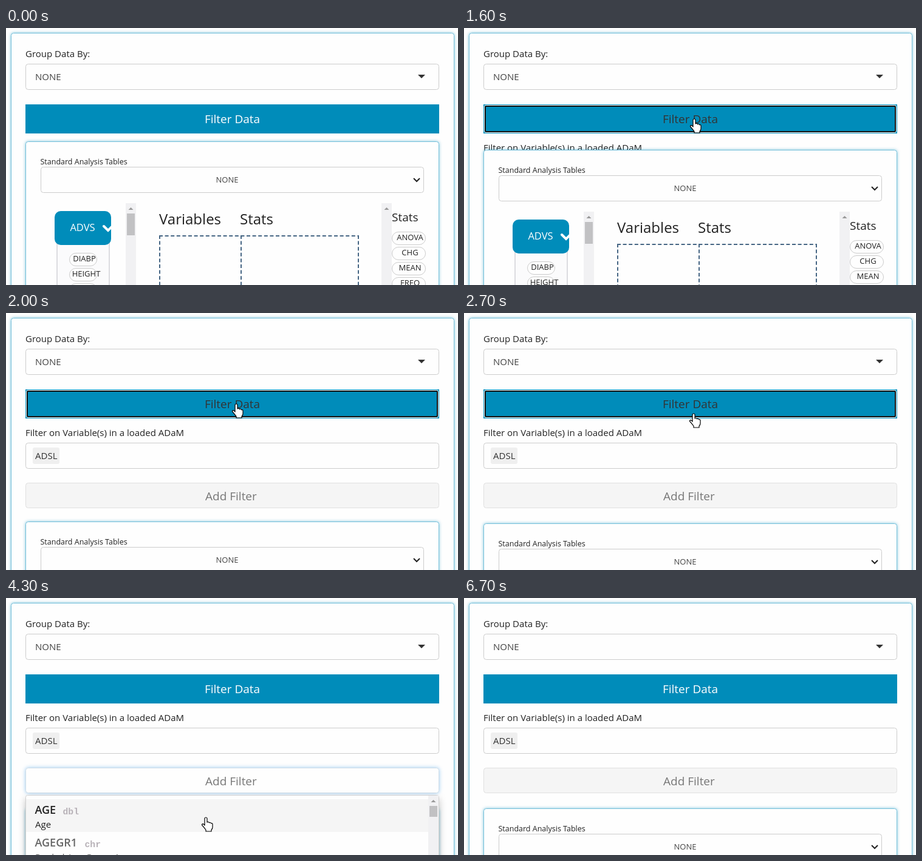
An HTML page that plays this animation: 744 px wide and 424 px high, repeating every 6.9 s.

```html
<!DOCTYPE html>
<html lang="en">
<head>
<meta charset="utf-8">
<title>Filter data</title>
<style>
  html, body { margin: 0; width: 100%; height: 100%; overflow: hidden; background: #fefefe; }
  svg { display: block; width: 744px; height: 424px; font: 15px "Open Sans", sans-serif; fill: #222; }
  .card { fill: #fefefe; stroke: #74bfda; filter: drop-shadow(0 0 2.5px rgba(0, 140, 186, .5)); }
  .field { fill: #fefefe; stroke: #ccc; }
  .blue { fill: #008cba; }
  .dash { fill: none; stroke: #466684; stroke-width: 2; stroke-dasharray: 6 3.6; }
  .pill { fill: #fefefe; stroke: #ccc; }
  .track { fill: #f1f1f3; }
  .thumb { fill: #c1c1c3; }
  .small { font-size: 13px; }
  .large { font-size: 19px; }
  .title { font-size: 24px; }
  .mid { text-anchor: middle; }
  .name { font-size: 18px; font-weight: 600; }
  .type { font: bold 14.7px "Liberation Mono", monospace; fill: #b8b2b8; }
  .cursor { fill: #fff; stroke: #000; stroke-width: 1.2; stroke-linejoin: round; }
</style>
</head>
<body>
<svg viewBox="0 0 744 424">
  <rect class="card" x="8.5" y="8.5" width="729" height="440" rx="4"/>
  <text x="32" y="48">Group Data By:</text>
  <rect class="field" x="32.5" y="59.5" width="680" height="42" rx="4"/>
  <text x="48" y="86" fill="#444">NONE</text>
  <path d="M678 77h12l-6 6z" fill="#333"/>

  <rect class="blue" x="32" y="126" width="681" height="48"/>
  <g id="ring" fill="none">
    <rect x="33.5" y="127.5" width="678" height="45" rx="2" stroke="#fff"/>
    <rect x="35" y="129" width="675" height="42" rx="2" stroke="#101010" stroke-width="2"/>
  </g>
  <text id="filterLabel" class="large mid" x="372.5" y="157">Filter Data</text>

  <g id="filters">
    <text x="32" y="203">Filter on Variable(s) in a loaded ADaM</text>
    <rect class="field" x="32.5" y="214.5" width="680" height="42" rx="4"/>
    <rect x="44" y="222" width="44" height="27" rx="3" fill="#efefef"/>
    <text x="48" y="241" fill="#333">ADSL</text>
    <rect id="addBox" x="32.5" y="280.5" width="680" height="41" rx="4"/>
    <text class="large" x="328" y="309" fill="#777">Add Filter</text>
    <path id="caret" d="M328.5 289v25" stroke="#222"/>
  </g>

  <g id="panel">
    <rect class="card" x="32.5" y="187.5" width="680" height="440" rx="4"/>
    <text x="56.5" y="225" font-size="12.5">Standard Analysis Tables</text>
    <rect class="field" x="57.5" y="229.5" width="630" height="42" rx="4"/>
    <text class="small mid" x="364" y="255" fill="#444">NONE</text>
    <path d="M671 248l5 5 5-5" fill="none" stroke="#222" stroke-width="2"/>

    <rect x="84" y="350" width="86" height="290" fill="#fbfbfc" stroke="#dcdce0" stroke-width="2"/>
    <rect class="blue" x="80" y="302" width="93" height="56" rx="10"/>
    <text class="mid" x="126" y="335" font-size="16.5" fill="#fff">ADVS</text>
    <clipPath id="headClip"><rect x="80" y="302" width="93" height="56"/></clipPath>
    <path d="M161 327l7 7 7-7" clip-path="url(#headClip)" fill="none" stroke="#fff" stroke-width="4" stroke-linecap="round"/>

    <rect class="track" x="197" y="289" width="17" height="340"/>
    <path d="M201.500 300h8l-4-4z" fill="#999"/>
    <rect class="thumb" x="199" y="306" width="13" height="36"/>
    <rect class="track" x="618" y="289" width="17" height="340"/>
    <path d="M622.500 300h8l-4-4z" fill="#999"/>

    <text class="title" x="252" y="324">Variables</text>
    <text class="title" x="385" y="324">Stats</text>
    <path class="dash" d="M252 343H581M253 342V640M387 342V640M580 342V640"/>
    <text class="large" x="635" y="319">Stats</text>
    <g id="pills"></g>
  </g>

  <g id="menu">
    <rect x="32.5" y="325.500" width="680" height="200" rx="3" fill="#fefefe" stroke="#d0d0d0" style="filter:drop-shadow(0 6px 6px rgba(0,0,0,.25))"/>
    <g id="options"></g>
    <rect class="track" x="695" y="326" width="17" height="110"/>
    <path d="M699.500 337h8l-4-4z" fill="#999"/>
    <rect class="thumb" x="697" y="343" width="13" height="18"/>
  </g>

  <g id="cursor" class="cursor">
    <path id="hand" d="M-2 2a2 2 0 0 1 4 0V8c1-1 3-.6 3.400.8c1-.8 3-.2 3.200 1c1.200-.6 2.400.2 2.400 1.600V16q0 2.500-2 4.500V23H0V20.500C-2 18-4 15-6.400 12.800C-7 11-5 10-3.600 11.200L-2 13Z"/>
    <path id="arrow" d="M0 0V16.500L3.800 13L6.300 19L8.800 18L6.300 12H11.500Z"/>
  </g>
</svg>
<script>
const LOOP = 6900, STEP = 100;
const FOCUS_FILTER = 1400, FOCUS_ADD = 3300, OPEN = 3500, CLOSE = 6200;
const SLIDE = { start: 1495, length: 555, distance: 160 };
const BLINK = { start: 3370, half: 530 };
// time, x, y of the pointer tip
const PATH = [
  [600, 379, 440], [1100, 379, 150], [2600, 379, 150], [3100, 366, 318],
  [3700, 366, 318], [4200, 329, 362], [5000, 329, 362], [5400, 329, 403],
  [5700, 329, 403], [6100, 329, 440]
];

const el = id => document.getElementById(id);
const show = (id, on) => el(id).setAttribute('display', on ? 'inline' : 'none');
const attrs = (node, values) => {
  for (const key in values) node.setAttribute(key, values[key]);
};
const ease = p => 0.5 - Math.cos(Math.PI * Math.min(1, Math.max(0, p))) / 2;

function pills(labels, x, width, top, textX) {
  return labels.map((label, i) => {
    const y = top + i * 25;
    return `<rect class="pill" x="${x + .5}" y="${y + .5}" width="${width - 1}" height="21" rx="10.5"/>
      <text class="small mid" x="${textX(i)}" y="${y + 14}">${label}</text>`;
  }).join('');
}

function option(name, type, typeX, label, y) {
  return `<g><rect x="33" y="${y}" width="662" height="54"/>
    <text class="name" x="47.500" y="${y + 24}">${name}</text>
    <text class="type" x="${typeX}" y="${y + 24.500}">${type}</text>
    <text x="48" y="${y + 46.500}">${label}</text></g>`;
}

el('pills').innerHTML =
  pills(['DIABP', 'HEIGHT', 'WEIGHT'], 104, 46, 371, i => i ? 132 : 129) +
  pills(['ANOVA', 'CHG', 'MEAN', 'FREQ'], 635, 56, 336, () => 665);
el('options').innerHTML =
  option('AGE', 'dbl', 93.5, 'Age', 332) +
  option('AGEGR1', 'chr', 129.5, 'Pooled Age Group 1', 386);

function pointerAt(t) {
  const i = PATH.findIndex(key => key[0] > t);
  if (i < 1) return null;
  const [t0, x0, y0] = PATH[i - 1], [t1, x1, y1] = PATH[i];
  const p = ease((t - t0) / (t1 - t0));
  return { x: x0 + (x1 - x0) * p, y: y0 + (y1 - y0) * p };
}

function draw(t) {
  const pointer = pointerAt(t);
  const within = (top, bottom) => !!pointer && pointer.y >= top && pointer.y <= bottom;
  const slide = SLIDE.distance * ease((t - SLIDE.start) / SLIDE.length);
  const open = t >= OPEN && t < CLOSE;
  const overFilter = within(126, 174);
  const overAdd = slide > 140 && within(280, 322);

  const filterFocused = t >= FOCUS_FILTER && t < FOCUS_ADD;
  show('ring', filterFocused);
  attrs(el('filterLabel'), { fill: overFilter || filterFocused ? '#333' : '#fff' });

  show('filters', slide > 0);
  attrs(el('panel'), { transform: `translate(0 ${Math.round(slide)})` });

  const [fill, stroke] = open ? ['#fefefe', '#cfdde8']
    : overAdd ? ['#e6e6e6', '#adadad'] : ['#f5f5f5', '#e0e0e0'];
  attrs(el('addBox'), { fill, stroke });
  el('addBox').style.filter = open ? 'drop-shadow(0 0 3px rgba(102,175,233,.65))' : 'none';
  const blinkOn = Math.floor((t - BLINK.start) / BLINK.half) % 2 === 0;
  show('caret', t >= BLINK.start && t < CLOSE && blinkOn);

  show('menu', open);
  const active = t > 5000 && (!pointer || pointer.y >= 386) ? 1 : 0;
  [...el('options').children].forEach((row, i) => {
    const on = i === active;
    attrs(row, { fill: on ? '#222' : '#666' });
    attrs(row.firstElementChild, { fill: on ? '#f5f5f5' : '#fefefe' });
  });

  show('cursor', pointer);
  if (pointer) {
    const clickable = overFilter || overAdd || (open && pointer.y > 326);
    show('hand', clickable);
    show('arrow', !clickable);
    attrs(el('cursor'), { transform: `translate(${Math.round(pointer.x)} ${Math.round(pointer.y)})` });
  }
}

const begin = performance.now();
function tick() {
  const t = (performance.now() - begin) % LOOP;
  draw(Math.floor(t / STEP) * STEP);
  requestAnimationFrame(tick);
}
tick();
</script>
</body>
</html>
```
